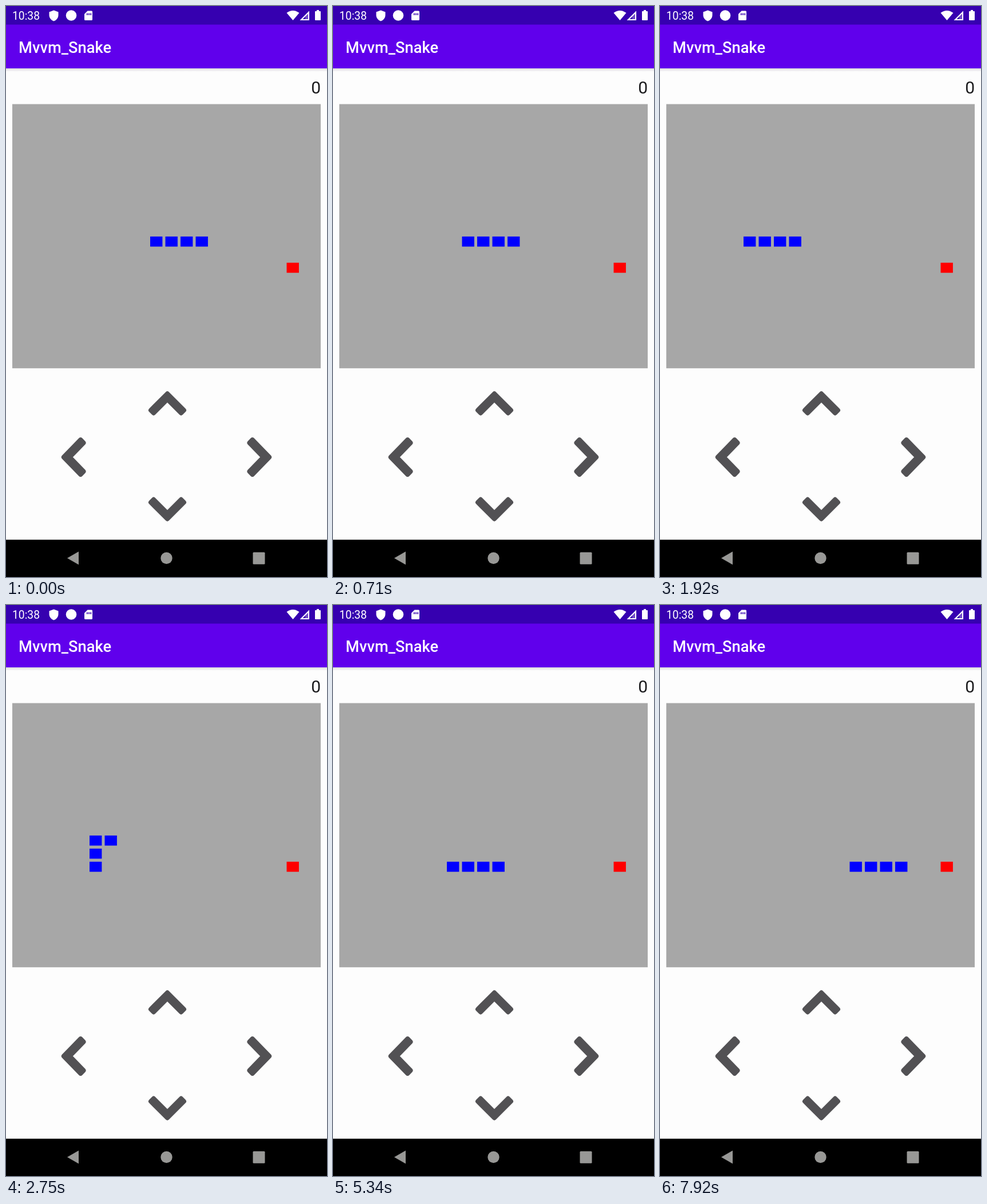
An HTML page for the animation above (8000 ms loop, 561 by 998 pixels).

```html
<!DOCTYPE html>
<html lang="en">
<head>
<meta charset="utf-8">
<title>Snake</title>
<style>
  html, body { margin: 0; width: 100%; height: 100%; overflow: hidden; background: #fdfdfd; }
  svg { display: block; font-family: Roboto, sans-serif; }
</style>
</head>
<body>
<svg width="561" height="998" viewBox="0 0 561 998">
  <defs>
    <linearGradient id="shade" x2="0" y2="1">
      <stop stop-opacity=".13"/>
      <stop offset="1" stop-opacity="0"/>
    </linearGradient>
    <path id="chevron" d="M0-5 29 24 24 29 0 5-24 29-29 24Z" stroke-width="8" stroke-linejoin="round"/>
    <rect id="cell" width="21.4" height="17.6"/>
  </defs>

  <!-- app bar -->
  <rect y="109" width="561" height="6" fill="url(#shade)"/>
  <rect width="561" height="109" fill="#6000ec"/>
  <rect width="561" height="32.5" fill="#3600b0"/>
  <text x="22" y="81.5" font-size="27.3" font-weight="500" fill="#fff">Mvvm_Snake</text>

  <!-- status bar -->
  <g fill="#fff">
    <text x="11" y="24" font-size="19.3">10:38</text>
    <path d="M83.5 7.5 91.5 10.5V16C91.5 21 88 25 83.5 26.5 79 25 75.5 21 75.5 16V10.5Z"/>
    <circle cx="114" cy="16.5" r="9.3"/>
    <path fill-rule="evenodd" d="M142.500 8.500H149.500Q151 8.500 151 10V23.500Q151 25 149.500 25H138.500Q137 25 137 23.500V14ZM141 12.500V16H142.700V12.500ZM144.200 12.500V16H145.900V12.500ZM147.400 12.500V16H149.100V12.500Z"/>
    <path d="M490.500 12Q501.500 4 512.500 12L501.500 25Z"/>
    <path fill-rule="evenodd" d="M530 8.500V25H513.500ZM528 13.500 518.500 23H528Z"/>
    <path d="M523 17.500 528.500 12V24H523Z" opacity=".3"/>
    <path d="M543 7H547V9H549Q550 9 550 10V24Q550 25 549 25H541Q540 25 540 24V10Q540 9 541 9H543Z"/>
  </g>

  <!-- game -->
  <text x="550" y="152.700" font-size="30" text-anchor="end" fill="#1c1c1e">0</text>
  <rect x="11" y="171.500" width="539" height="461.700" fill="#a7a7a7"/>
  <use href="#cell" x="490.500" y="448.700" fill="#f00"/>
  <g id="snake" fill="#00f"></g>

  <!-- controls -->
  <g fill="#525154" stroke="#525154">
    <use href="#chevron" transform="translate(282 682.500)"/>
    <use href="#chevron" transform="translate(282 891.500) scale(1 -1)"/>
    <use href="#chevron" transform="translate(106 788.500) rotate(-90) scale(1.045 1.015)"/>
    <use href="#chevron" transform="translate(455 788.500) rotate(90) scale(1.045 1.015)"/>
  </g>

  <!-- navigation bar -->
  <rect y="932.800" width="561" height="65.200" fill="#000"/>
  <g fill="#989896">
    <path d="M107 965 127 953.500V976.500Z"/>
    <circle cx="280.500" cy="965" r="10.200"/>
    <rect x="431.500" y="954.700" width="21" height="21" rx="1.500"/>
  </g>
</svg>
<script>
const LOOP = 8000, STEP = 500, LENGTH = 4;
const snake = document.getElementById('snake');
const cells = Array.from({ length: LENGTH }, () => {
  const cell = document.createElementNS('http://www.w3.org/2000/svg', 'use');
  cell.setAttribute('href', '#cell');
  return snake.appendChild(cell);
});

// Grid cell of the head after n moves: left, two down, then right.
function headAt(n) {
  if (n <= 4) return [9 - n, 0];
  if (n <= 6) return [5, n - 4];
  return [n - 1, 2];
}

function draw(now) {
  const moves = Math.floor((now % LOOP + STEP / 2) / STEP);
  cells.forEach((cell, i) => {
    const [col, row] = headAt(moves - i);
    cell.setAttribute('x', 13.5 + col * 26.5);
    cell.setAttribute('y', 402.9 + row * 22.9);
  });
}

const start = performance.now();
function tick() {
  draw(performance.now() - start);
  requestAnimationFrame(tick);
}
tick();
</script>
</body>
</html>
```
